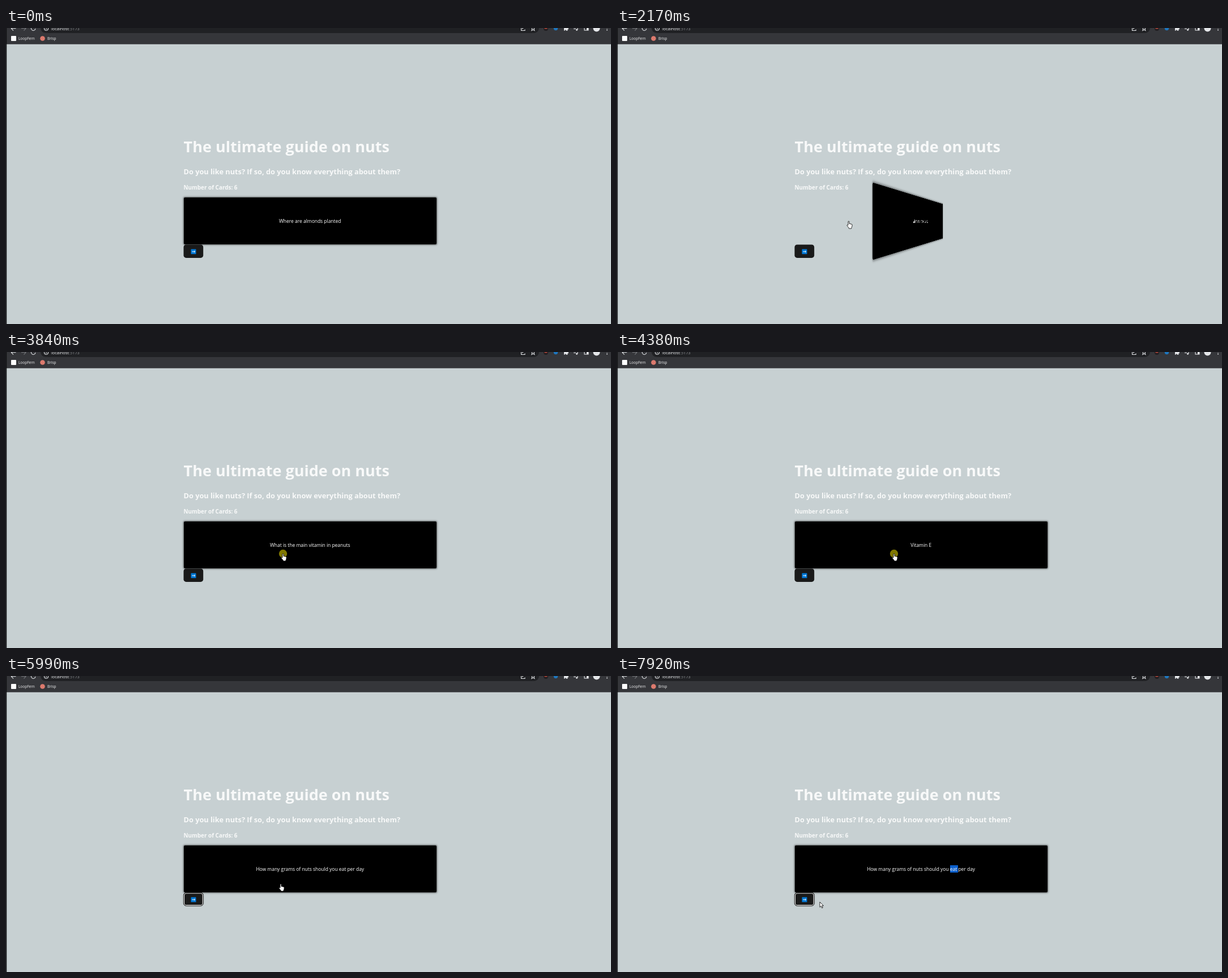
Write an HTML page that moves like this. It is 1068x524 px and loops after 7990 ms.

```html
<!DOCTYPE html>
<html lang="en">
<head>
<meta charset="utf-8">
<title>Nut flashcards</title>
<style>
  html, body { margin: 0; width: 100%; height: 100%; overflow: hidden; background: #c7d0d2; }
  body { position: relative; font-family: "Open Sans", "Noto Sans", sans-serif; }
  svg { position: absolute; left: 0; top: 0; width: 1068px; height: 524px; }
  .page { font-weight: 700; fill: #f8f9f9; }
  .line { fill: none; stroke: #e4e6e9; stroke-width: 1.1; }
  .light { fill: #e4e6e9; }
  #card {
    position: absolute; left: 313.5px; top: 299.7px; width: 446.5px; height: 83.8px;
    display: flex; align-items: center; justify-content: center;
    background: #000; border-radius: 2px; box-shadow: 0 0 3px 1px rgba(0, 0, 0, .55);
  }
  #label { display: block; color: #fff; font-size: 8.46px; white-space: pre; }
  #label mark { background: #0b5fcc; color: #fff; padding: .8px 0; }
</style>
</head>
<body>
<svg viewBox="0 0 1068 524">
  <!-- browser bar -->
  <rect width="1068" height="28.5" fill="#35363a"/>
  <rect y="28" width="1068" height=".7" fill="#4c4d51"/>
  <rect x="61" y="-9" width="880" height="18" rx="9" fill="#202124"/>
  <g class="line">
    <path d="M17.5 .8H9.5M13-3L9.3 .8 13 4.6"/>
    <path d="M27 .8H35M31.500-3L35.200 .8 31.500 4.600" stroke="#77797d"/>
    <path d="M52 1.200A3.800 3.800 0 1 1 50.500-2.400"/>
    <circle cx="71" cy=".8" r="3.500"/>
    <path d="M71 .3V2.700"/>
    <path d="M909.500-1V4.500H916V2.500M911.500 2Q912-1 916-1"/>
    <path d="M927.500-1.200L930.600-1.500 934-1.200 931.900 1.200 932.800 4.500 930.500 2.900 928 4.500 928.800 1.200Z"/>
    <path d="M1002-1H1008M1002 1.500H1006M1009-2V3.200"/>
    <rect x="1021" y="-3" width="7" height="7"/>
  </g>
  <circle cx="953" cy="1" r="4" fill="#211d20"/>
  <rect x="950.500" y="-.5" width="5" height="2" fill="#b5483b"/>
  <circle cx="970.500" cy=".5" r="3.700" fill="#1e76bd"/>
  <g class="light">
    <path d="M985-2H991.500V0Q993.500 0 993 1.800 992.800 2.700 991.500 2.600V4.800H989Q988.500 3 987 3.200 986.500 3.500 986.500 4.800H985Z"/>
    <circle cx="1007.500" cy="3.300" r="1.500"/>
    <rect x="1025" y="-3" width="3" height="7"/>
    <circle cx="1042.500" cy=".5" r="6"/>
    <circle cx="1061" cy="-.5" r="1"/>
    <circle cx="1061" cy="3.500" r="1"/>
  </g>
  <text x="80" y="3.500" font-size="7.4" fill="#eceef0">localhost<tspan fill="#8f9296">:5173</tspan></text>
  <rect x="9" y="14" width="9" height="9" rx="1" fill="#fff"/>
  <circle cx="64.500" cy="18.500" r="4.300" fill="#dc7a6e"/>
  <g font-size="6.5" fill="#f1f2f3">
    <text x="22" y="21">LoopFern</text>
    <text x="73" y="21">Brisp</text>
  </g>
  <rect width="1.200" height="524" fill="#101113"/>

  <!-- page -->
  <g class="page">
    <text x="313.500" y="219.600" font-size="27.03">The ultimate guide on nuts</text>
    <text x="313.500" y="258.600" font-size="12.76">Do you like nuts? If so, do you know everything about them?</text>
    <text x="313.500" y="285.600" font-size="9.94">Number of Cards: 6</text>
  </g>
  <rect x="313.500" y="383.500" width="34.700" height="23.400" rx="4.500" fill="#1a1a1a"/>
  <g id="ring" fill="none">
    <rect x="313.400" y="383.600" width="35" height="23.400" rx="5" stroke="#101010"/>
    <rect x="314.500" y="384.700" width="32.800" height="21.200" rx="4" stroke="#fff" stroke-width="1.1"/>
  </g>
  <rect x="326.500" y="391.500" width="9" height="8.800" rx=".6" fill="#0078d7"/>
  <path d="M328.300 395.900H333.500M332 394.400L333.600 395.900 332 397.400" fill="none" stroke="#fff"/>
</svg>

<div id="card"><span id="label"></span></div>

<svg viewBox="0 0 1068 524">
  <g id="cursor">
    <circle id="press" r="7.200" fill="#fff000" fill-opacity=".5"/>
    <g fill="#fff" stroke="#000" stroke-width=".8" stroke-linejoin="round">
      <path id="hand" d="M-1 6.500V1a1 1 0 0 1 2 0v3.400l4 .8q1.300 .4 1.200 1.800l-.6 3.400-.8 1.400v1.200H.4l-.2-1.200-2.900-3.600q-.8-1.200 .2-1.600 .8-.2 1.500 .7z"/>
      <path id="arrow" d="M0 0V9.300L2.200 7.300 3.800 10.800 5.300 10.100 3.800 6.700H6.600Z"/>
    </g>
  </g>
</svg>

<script>
const LOOP = 7990, STEP = 70, FLIP = 150, DEPTH = 562, ENTER = 130;

const CARDS = [
  ["Where are almonds planted", "California"],
  ["What is the main vitamin in peanuts", "Vitamin E"],
  ["How many grams of nuts should you eat per day", "28 grans"]
];

// a click on the card flips it after `hold` ms, one on the button deals card `next`
const CLICKS = [
  { at: 910, next: 0 }, { at: 1540, hold: 38 }, { at: 2100, hold: 20 },
  { at: 2870, next: 1 }, { at: 3840, hold: 38 }, { at: 4380, hold: 52 },
  { at: 5150, next: 2 }, { at: 6270, hold: 36 }, { at: 6740, hold: 52, selects: true },
  { at: 7590, next: 2 }
];

// pointer moves: start, end, x, y, downward bow of the path
const MOVES = [
  [ENTER, 840, 332, 384, 0], [980, 1400, 399, 341, 0], [1820, 2030, 409, 342, 0],
  [2240, 2730, 333, 397, 46], [3280, 3770, 489, 357, 45], [4450, 4980, 335, 396, 23],
  [5220, 5990, 485, 368, 60], [6950, 7510, 335, 396, 28], [7660, 7870, 358, 400, 0]
];

const el = id => document.getElementById(id);
const [card, label, ring, cursor, press, hand, arrow] =
  ["card", "label", "ring", "cursor", "press", "hand", "arrow"].map(el);
const show = (node, on) => { node.style.display = on ? "" : "none"; };
const clamp = p => Math.min(1, Math.max(0, p));
const smooth = p => p * p * (3 - 2 * p);

// the screen refreshes in fixed steps, counted from the latest click
function tick(t) {
  const last = CLICKS.filter(c => c.at <= t).pop();
  const start = last ? last.at : 0;
  return start + Math.floor((t - start) / STEP) * STEP;
}

// cubic-bezier(.25, .1, .25, 1)
function ease(x) {
  const curve = (s, a, b) => 3 * (1 - s) ** 2 * s * a + 3 * (1 - s) * s * s * b + s ** 3;
  let lo = 0, hi = 1;
  for (let i = 0; i < 20; i++) {
    const mid = (lo + hi) / 2;
    if (curve(mid, .25, .25) < x) lo = mid; else hi = mid;
  }
  return curve(lo, .1, 1);
}

function angleAt(t) {
  const starts = CLICKS.filter(c => c.hold).map(c => c.at + c.hold).filter(s => s <= t);
  if (!starts.length) return 0;
  const p = (t - starts[starts.length - 1]) / FLIP;
  const turn = p >= 1 ? 180 : 180 * ease(p);
  return starts.length % 2 ? turn : 180 - turn;
}

function pointAt(t) {
  let x = 1036, y = 514;
  for (const [start, end, toX, toY, bow] of MOVES) {
    const p = smooth(clamp((t - start) / (end - start)));
    x += (toX - x) * p;
    y += (toY - y) * p + 4 * p * (1 - p) * bow;
  }
  return [x, y];
}

function drawCard(t) {
  const angle = angleAt(t), back = angle > 90, flat = angle % 180 === 0;
  const dealt = CLICKS.filter(c => "next" in c && c.at + STEP <= t).pop();
  const [question, answer] = CARDS[dealt ? dealt.next : 0];
  const selected = CLICKS.some(c => c.selects && c.at <= t);
  const html = back ? answer : selected ? question.replace("eat ", "<mark>eat </mark>") : question;
  if (label.dataset.html !== html) label.innerHTML = label.dataset.html = html;
  card.style.transform = flat ? "none" : `perspective(${DEPTH}px) rotateY(${angle}deg)`;
  label.style.transform = back && !flat ? "scaleX(-1)" : "none";
}

function drawCursor(t) {
  const [x, y] = pointAt(t);
  const within = (left, top, right, bottom) => x > left && x < right && y >= top && y < bottom;
  const pointing = within(313, 300, 760, 383.5) || within(313, 383.5, 348, 407);
  cursor.setAttribute("transform", `translate(${x} ${y})`);
  show(cursor, t >= ENTER);
  show(hand, pointing);
  show(arrow, !pointing);
  show(press, CLICKS.some(c => t >= c.at && t < c.at + STEP));
}

function render(now) {
  const t = tick(now % LOOP);
  const last = CLICKS.filter(c => c.at <= t).pop();
  drawCard(t);
  drawCursor(t);
  show(ring, last && "next" in last && t >= last.at + STEP);
}

const begin = performance.now();
function loop() {
  render(performance.now() - begin);
  requestAnimationFrame(loop);
}
loop();
</script>
</body>
</html>
```
